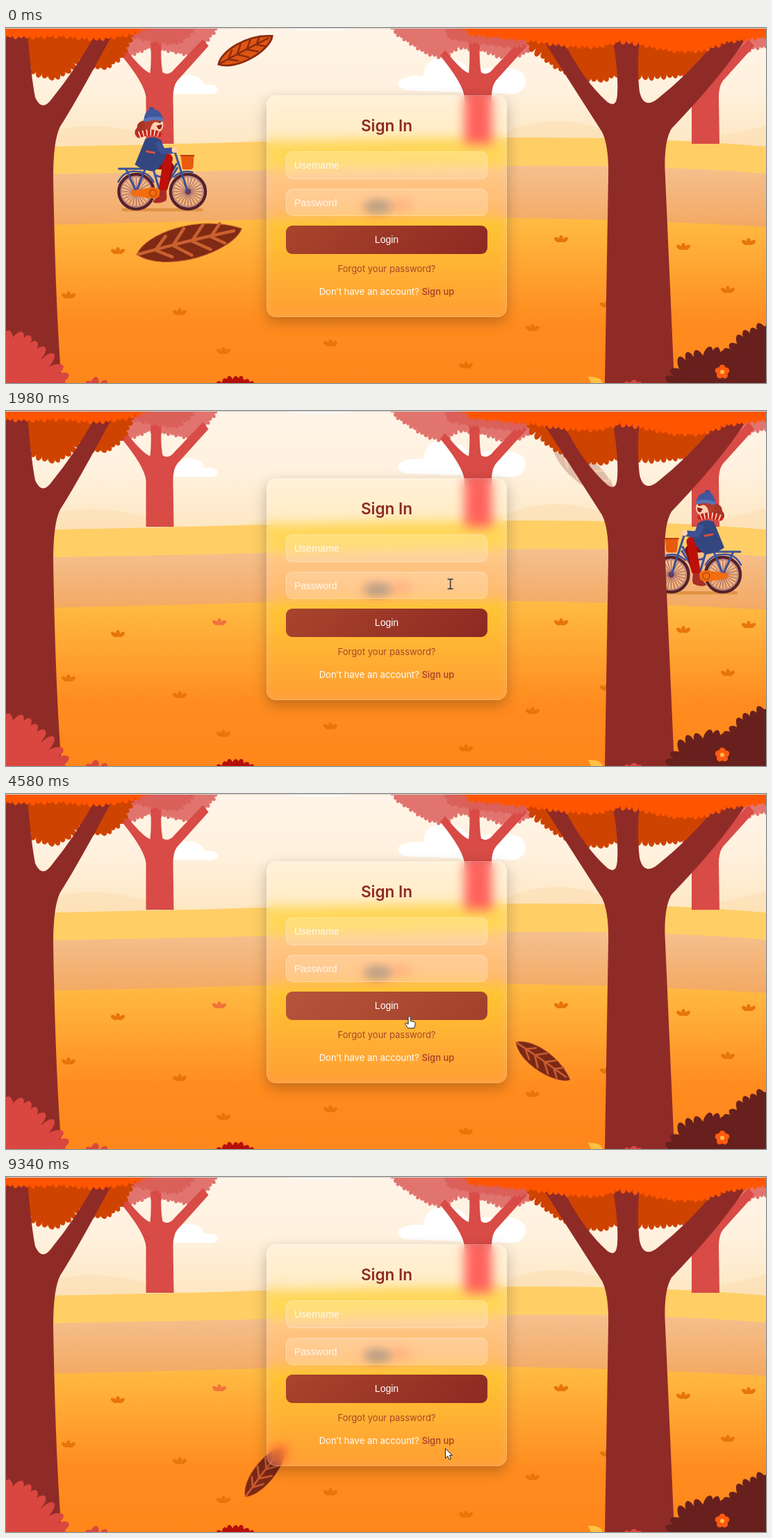
An HTML page for the animation above (9410 ms loop, 1094x512 px).

```html
<!DOCTYPE html>
<html lang="en">
<head>
<meta charset="utf-8">
<title>Autumn sign in</title>
<style>
  html, body { margin: 0; width: 100%; height: 100%; overflow: hidden; }
  #stage { position: relative; width: 1094px; height: 512px; overflow: hidden; font: 13px Inter, sans-serif; }
  #stage > svg { position: absolute; left: 0; top: 0; }
  #topline { position: absolute; width: 100%; height: 1px; background: #d6d2cd; }
  .card {
    position: absolute; left: 375px; top: 96.5px; width: 346px; height: 320px;
    box-sizing: border-box; padding: 0 28px; border-radius: 14px;
    background: rgba(255, 255, 255, .2);
    box-shadow: 0 7px 20px rgba(0, 0, 0, .25), inset 0 0 0 1px rgba(255, 255, 255, .18);
    backdrop-filter: blur(8px) saturate(1.5);
  }
  #signup { top: 84.5px; height: 343.5px; }
  h2 { margin: 0; height: 81.5px; font-size: 22.5px; font-weight: 600; line-height: 88px; text-align: center; color: #8e2923; }
  .field, .button {
    box-sizing: border-box; height: 39.5px; margin-bottom: 14px; border-radius: 9px;
    font: 14px/38px "Liberation Sans", Arial, sans-serif;
  }
  .field { padding-left: 11px; color: rgba(255, 255, 255, .85); background: rgba(255, 255, 255, .2); border: 1px solid rgba(255, 255, 255, .28); }
  .button { height: 40.5px; line-height: 40px; text-align: center; color: #fff; background: linear-gradient(135deg, #a9452c, #8e2923); }
  .button.hover { background: linear-gradient(135deg, #b5543b, #a3402b); }
  .note { position: absolute; left: 0; width: 100%; bottom: 27px; line-height: 20px; text-align: center; color: #fff; }
  .note b { font-weight: 500; color: #a53d28; }
  .forgot { bottom: 60px; color: #a8452a; }
  #status {
    position: absolute; left: 0; bottom: 0; width: 128px; height: 18px; border-radius: 0 4px 0 0;
    background: #d0e7f2; color: #44505a; font: 9.6px/19px "Open Sans", sans-serif; text-indent: -1px; white-space: nowrap;
  }
</style>
</head>
<body>
<div id="stage">
  <svg width="1094" height="512" viewBox="0 0 1094 512">
    <defs>
      <linearGradient id="sky" x2="0" y2="1"><stop stop-color="#fff4e8"/><stop offset=".5" stop-color="#fff1dd"/><stop offset="1" stop-color="#fde5bf"/></linearGradient>
      <linearGradient id="road" x2="0" y2="1"><stop stop-color="#f5c08e"/><stop offset="1" stop-color="#f3a55c"/></linearGradient>
      <linearGradient id="grass" x2="0" y2="1"><stop stop-color="#ffbc44"/><stop offset=".62" stop-color="#ff8c1f"/><stop offset="1" stop-color="#ff861a"/></linearGradient>
      <path id="pinkTree" fill="#d84b46" d="M-20 167V100Q-22 80-55 40L-48 32Q-24 62-14 65Q-11 40-15 0H3Q0 45 4 64Q13 70 22 58L62 16L70 26L25 76Q19 84 19 100L20 167Z"/>
      <g id="leaf">
        <path d="M-78 2C-58-26 20-38 78-6C60 24-40 38-78 2Z"/>
        <path fill="none" stroke-width="4.5" stroke-linecap="round" d="M-75 2Q0-4 66-5M-50 1l18-17M-50 1l22 14M-24-1l20-21M-24-1l24 19M4-2l20-20M4-2l24 17M32-3l16-16M32-3l18 13"/>
      </g>
    </defs>
    <rect width="1094" height="180" fill="url(#sky)"/>
    <path fill="#fddfb2" opacity=".6" d="M60 150Q130 130 210 156T400 150L400 180H60ZM720 150Q790 118 870 150T1094 140V180H720Z"/>
    <g fill="#fff">
      <path d="M240 95V74Q262 62 280 73Q287 80 284 82Q306 80 305 90Q304 96 290 95Z"/>
      <path d="M574 90Q558 82 568 74Q588 66 600 70Q604 42 630 42Q654 44 664 58H722Q750 60 748 80Q744 96 725 95Z"/>
      <path d="M395 0Q450 7 510 0Z"/>
    </g>
    <path fill="#ffce65" d="M0 172Q200 169 370 164T735 158T1094 171V230H0Z"/>
    <path fill="url(#road)" d="M0 212Q200 209 370 205T735 199T1094 210V300H0Z"/>
    <path fill="url(#grass)" d="M0 285Q200 281 370 276T735 274T1094 287V512H0Z"/>
    <ellipse cx="535" cy="258" rx="22" ry="10" fill="#75604c"/>
    <ellipse cx="570" cy="255" rx="14" ry="6" fill="#e07c4c"/>
    <g id="meadow"></g>
    <g id="pinkLeaves"></g>
    <use href="#pinkTree" x="221.5"/><use href="#pinkTree" x="680"/><use href="#pinkTree" x="1007"/>
    <g id="pinkTops"></g>

    <g id="rider" stroke-linecap="round" stroke-linejoin="round">
      <rect x="-58" y="260" width="117" height="4.5" rx="2" fill="#d98a35" opacity=".75"/>
      <g id="wheels" fill="none"></g>
      <g fill="none" stroke="#3d5199" stroke-width="3">
        <path d="M-62 203H-18M-52 203L-37 236M-24 203L-37 236L-2 239L-13 202M-2 239L22 202M-10 212Q8 222 21 196M37 236L19 180L10 177"/>
        <path d="M-63 222Q-54 205-37 207Q-20 207-12 222M17 215Q29 204 44 208" stroke-width="2.5"/>
      </g>
      <path fill="#e85a0c" d="M27 183H46L45 201Q44 204 41 204H32Q29 204 29 201Z"/>
      <path d="M27 184H46" stroke="#b93e08" stroke-width="2"/>
      <path fill="none" stroke="#8d0d0a" stroke-width="11" d="M-8 198L12 200L4 226"/>
      <path fill="#f26d10" d="M-42 234L-14 230Q-2 229-1 239Q-3 248-13 246L-42 242Q-48 238-42 234Z"/>
      <circle cx="-13" cy="238" r="5" fill="none" stroke="#b94a0a" stroke-width="1.5"/>
      <path fill="none" stroke="#bd1009" stroke-width="13" d="M-7 192L9 188L2 230"/>
      <path fill="#a92c25" d="M-3 234H6L7 244L6 249Q-6 255-13 251Q-11 246-4 243Z"/>
      <path fill="#34467f" d="M-24 160Q-12 154-1 162L6 182Q3 198-12 207Q-28 205-39 197Q-32 180-24 160Z"/>
      <path fill="none" stroke="#3c5092" stroke-width="9" d="M-5 168L1 178L13 177"/>
      <circle cx="18" cy="176" r="4" fill="#ffd0b0"/>
      <path d="M-22 178L-11 180" stroke="#d9503c" stroke-width="3"/>
      <path fill="#a93427" d="M-25 133Q-36 135-36 144Q-41 149-38 155Q-27 153-23 146Q-14 157-5 148L1 128Z"/>
      <ellipse cx="-8" cy="140" rx="10" ry="11" fill="#ffd0b0"/>
      <path fill="#b63c2b" d="M-25 138V128H2Q1 139-7 136Q-13 133-17 146Q-25 148-25 138Z"/>
      <path fill="#8e1c20" d="M-8 141L0 139Q0 147-5 146Z"/>
      <circle cx="-3" cy="136" r="1" fill="#422"/>
      <path fill="none" stroke="#c9281d" stroke-width="9" d="M-33 154Q-18 148-5 153"/>
      <path fill="none" stroke="#fff0df" stroke-width="9" stroke-linecap="butt" stroke-dasharray="1.5 4" d="M-33 154Q-18 148-5 153"/>
      <circle cx="-15" cy="118" r="4" fill="#3a4f95"/>
      <path fill="#3f579f" d="M-26 133Q-25 117-13 117Q0 119 1 132Z"/>
      <path d="M-24 133Q-12 128 0 132" fill="none" stroke="#5873b8" stroke-width="5"/>
    </g>
    <use id="orangeLeaf" href="#leaf" fill="#e05510" stroke="#8a2c10" stroke-width="5"/>
    <use id="gustLeaf" href="#leaf" fill="#7f2a14" stroke="#c9602f"/>
    <use id="driftLeaf" href="#leaf" fill="#7b2816" stroke="#c65a30"/>

    <g id="canopyBack"></g>
    <g fill="#8f2b27">
      <path d="M-5-5H30Q36 70 42 100Q52 122 66 102Q100 60 128 10L150 15Q100 108 78 142Q68 162 68 215Q71 400 80 512H-5Z"/>
      <path d="M862 512L867 215Q868 170 858 150L775 20L800 14Q830 75 866 107Q879 116 880 95Q882 60 872 10H912Q908 60 912 92Q918 118 938 102Q985 65 1025 15H1065Q1030 70 958 145Q946 165 949 215L962 512Z"/>
    </g>
    <g id="front"></g>
    <path fill="#ffc043" d="M838 503Q856 502 859 512H842Z"/>
    <g id="flower" fill="#ff5a12"></g>
  </svg>

  <div class="card" id="signin">
    <h2>Sign In</h2>
    <div class="field">Username</div>
    <div class="field">Password</div>
    <div class="button" id="login">Login</div>
    <div class="note forgot">Forgot your password?</div>
    <div class="note">Don’t have an account? <b>Sign up</b></div>
  </div>
  <div class="card" id="signup">
    <h2>Sign Up</h2>
    <div class="field">Username</div>
    <div class="field">Email</div>
    <div class="field">Password</div>
    <div class="button">Register</div>
    <div class="note">Already have an account? <b>Sign in</b></div>
  </div>

  <div id="topline"></div>
  <div id="status">127.0.0.1:5500/index.html#</div>
  <svg width="1094" height="512">
    <g id="cursor" stroke-linejoin="round">
      <path id="arrow" fill="#fff" stroke="#222" d="M0 0V14L3.3 11L5.5 16L8 15L5.8 10H10Z"/>
      <path id="beam" fill="none" stroke="#333" stroke-width="1.5" d="M-4-7H-1L0-6L1-7H4M0-6V6M-4 7H-1L0 6L1 7H4"/>
      <path id="hand" fill="#fff" stroke="#222" d="M-1.6 1Q0-1.5 1.6 1V6.5L7 7.8Q9 8.5 8.6 11L7 17H-2L-6 11Q-6 8.5-3.6 9.8L-1.6 11.5Z"/>
    </g>
  </svg>
</div>

<script>
const LOOP = 9410, TICK = LOOP / 138;
const SIGNUP_FROM = 6600, SIGNUP_TO = 7900;
const $ = id => document.getElementById(id);
const add = (id, markup) => $(id).insertAdjacentHTML('beforeend', markup);
const petal = (x, y, turn, rx, ry) =>
  `<ellipse rx="${rx}" ry="${ry}" transform="translate(${x} ${y}) rotate(${turn})"/>`;

// Filled outline whose edge is lined with rounded petals.
function frill(id, color, outline, step = 8, depth = 7) {
  const pts = outline.split(' ').map(p => p.split(',').map(Number));
  let petals = '';
  for (let i = 1; i < pts.length; i++) {
    const [ax, ay] = pts[i - 1], [bx, by] = pts[i];
    const n = Math.max(1, Math.round(Math.hypot(bx - ax, by - ay) / step));
    const turn = Math.atan2(by - ay, bx - ax) * 180 / Math.PI;
    for (let k = 0; k < n; k++)
      petals += petal(ax + (bx - ax) * k / n, ay + (by - ay) * k / n, turn, step * .58, depth + k % 2 * 2);
  }
  add(id, `<g fill="${color}"><polygon points="${outline}"/>${petals}</g>`);
}

function tuft(x, y, color = '#e77507') {
  const blades = [-55, 0, 55].map(a => petal(x + a / 10, y + Math.abs(a) / 40, a, 2.8, 5)).join('');
  add('meadow', `<g fill="${color}">${blades}</g>`);
}

[[161, 321], [90, 385], [250, 409], [313, 465], [467, 454], [662, 486], [758, 432], [799, 304],
 [975, 315], [1069, 308], [1039, 377], [865, 398]].forEach(p => tuft(...p));
tuft(307, 304, '#f0733a');

const PINK = '#e1746e', ROSE = '#db605a', RUST = '#cf4300', BRIGHT = '#ff5500';
frill('pinkLeaves', PINK, '150,-20 158,22 178,36 205,25 240,30 268,36 292,10 315,-20', 6, 5);
frill('pinkLeaves', PINK, '552,-20 562,4 580,16 605,33 630,40 650,24 690,30 720,42 750,32 775,-20', 6, 5);
frill('pinkLeaves', PINK, '935,-20 945,30 970,36 1010,30 1050,36 1075,26 1100,22 1100,-20', 6, 5);
frill('pinkTops', ROSE, '175,-20 180,8 205,14 245,20 266,4 275,-20', 6, 5);
frill('pinkTops', ROSE, '630,-20 638,10 665,16 700,20 735,24 770,12 780,-20', 6, 5);
frill('canopyBack', RUST, '30,-10 40,60 65,69 88,60 106,40 118,50 140,54 164,38 178,8 190,-10');
frill('canopyBack', RUST, '750,-10 758,28 775,38 800,56 830,68 855,72 885,60 920,68 955,65 985,60 1010,34 1030,-10');
frill('front', BRIGHT, '-10,-10 -10,6 30,8 80,6 130,11 180,4 212,-10');
frill('front', BRIGHT, '660,-10 668,4 710,8 760,13 800,20 850,22 880,14 915,18 955,27 1000,28 1040,14 1100,6 1100,-10');
frill('front', '#d94740', '-20,452 15,452 45,472 68,494 80,520 -20,530', 13, 16);
frill('front', '#d94740', '118,522 128,511 140,515 150,522', 9, 8);
frill('front', '#d94740', '890,522 903,514 915,522', 9, 7);
frill('front', '#b50f0a', '305,522 316,513 330,510 344,513 355,522', 8, 8);
frill('front', '#67201d', '960,522 975,488 1010,474 1040,482 1060,456 1100,436 1100,530', 12, 15);

for (let a = 0; a < 360; a += 72)
  add('flower', `<circle cx="1031" cy="490" r="4.6" transform="rotate(${a} 1031 496)"/>`);
add('flower', '<circle cx="1031" cy="496" r="3" fill="#ffc043"/>');

for (const x of [-37, 37.5]) {
  let spokes = '';
  for (let a = 0; a < 360; a += 15) spokes += `<path d="M0 0V-21" transform="rotate(${a})"/>`;
  add('wheels', `<g transform="translate(${x} 236)">
    <g stroke="#7d4968" stroke-width=".8">${spokes}</g>
    <circle r="25" stroke="#55222d" stroke-width="4.5"/><circle r="21.5" stroke="#b98088" stroke-width="1.5"/>
    <circle r="4" fill="#6b3550"/></g>`);
}

// Each row is [time, ...values]; values run straight between rows.
function track(rows, t) {
  const i = rows.findIndex(r => r[0] > t);
  if (i < 0) return rows.at(-1).slice(1);
  if (!i) return rows[0].slice(1);
  const [a, b] = [rows[i - 1], rows[i]], k = (t - a[0]) / (b[0] - a[0]);
  return a.slice(1).map((v, n) => v + (b[n + 1] - v) * k);
}

const POINTER = [[500, 975, 520], [1010, 888, 440], [1980, 639, 249], [2300, 600, 292], [2700, 562, 309],
  [4250, 562, 309], [4900, 600, 333], [5400, 625, 380], [6840, 625, 380], [7300, 632.5, 391.5]];
const DRIFT = [[2600, 960, 545], [3000, 880, 500], [3410, 814, 460], [3950, 796, 421], [4940, 758, 365],
  [6100, 677, 328], [7510, 553, 323], [8480, 458, 362], [9340, 374, 424]];
const GUST = [[0, 264, 310, -11, 1, 1], [1010, 597, 432, 20, .94, .68], [1980, 833, 82, 42, .78, .25], [2060, 850, 50, 45, .76, 0]];

function place(id, x, y, turn, scale, opacity = 1) {
  $(id).setAttribute('transform', `translate(${x} ${y}) rotate(${turn}) scale(${scale})`);
  $(id).setAttribute('opacity', opacity);
}
const show = (id, on) => $(id).style.display = on ? '' : 'none';

function pose(t) {
  const turnAt = 1608, peak = 224.5 + .6 * turnAt;
  const ahead = t < turnAt;
  const bikeX = ahead ? 224.5 + .6 * t : peak - .526 * (t - turnAt);
  $('rider').setAttribute('transform', `translate(${bikeX} 0) scale(${ahead ? 1 : -1} 1)`);

  place('orangeLeaf', 345 - .193 * t, 33 + .025 * t, -25 - .02 * t, .56);
  const [gx, , turn, scale, opacity] = track(GUST, t), s = t / 1000;
  place('gustLeaf', gx, 310 + 361 * s - 239.7 * s * s, turn, scale, opacity);
  place('driftLeaf', ...track(DRIFT, t), 59 - .0184 * (t - 3410), .61, t < 2600 ? 0 : 1);

  const registering = t >= SIGNUP_FROM && t < SIGNUP_TO;
  show('signin', !registering);
  show('signup', registering);

  const [x, y] = track(POINTER, t);
  const inside = x > 403 && x < 693;
  const onLink = inside && x > 600 && y > 370 && y < (registering ? 402 : 389);
  const onButton = inside && !registering && y > 285 && y < 325;
  const onField = inside && !registering && (y > 178 && y < 217 || y > 231 && y < 271);
  show('hand', onLink || onButton);
  show('beam', onField);
  show('arrow', !onLink && !onButton && !onField);
  show('status', onLink);
  $('login').classList.toggle('hover', onButton);
  $('cursor').setAttribute('transform', `translate(${x} ${y})`);
}

function frame() {
  pose(Math.floor(performance.now() % LOOP / TICK + .3) % 138 * TICK);
  requestAnimationFrame(frame);
}
frame();
</script>
</body>
</html>
```
